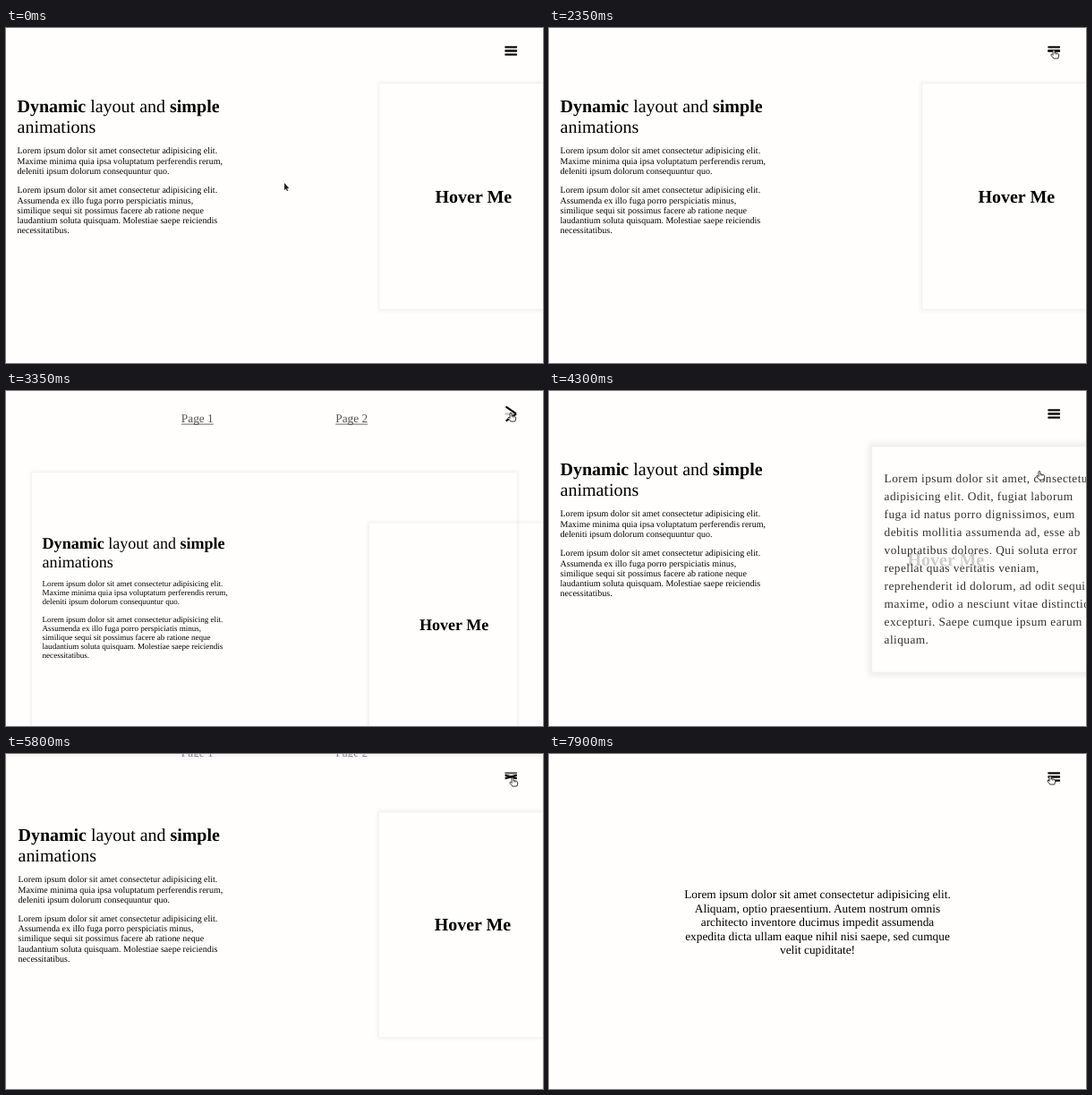
Recreate the animation shown at these times as an HTML page with a canvas. Size 600 px wide and 374 px high, loop 8 s.

```html
<!DOCTYPE html>
<html lang="en">
<head>
<meta charset="utf-8">
<title>Dynamic layout</title>
<style>
  html, body { margin: 0; width: 100%; height: 100%; overflow: hidden; background: #fffefc; }
  canvas { display: block; width: 600px; height: 374px; }
</style>
</head>
<body>
<canvas id="stage"></canvas>
<script>
const W = 600, H = 374, LOOP = 8000;
const BG = '#fffefc', INK = '#000';
const SERIF = '"Liberation Serif", "Times New Roman", serif';
const canvas = document.getElementById('stage');
const ctx = canvas.getContext('2d');
const dpr = window.devicePixelRatio || 1;
canvas.width = W * dpr;
canvas.height = H * dpr;
ctx.textRendering = 'geometricPrecision';

const intro = [
  'Lorem ipsum dolor sit amet consectetur adipisicing elit.',
  'Maxime minima quia ipsa voluptatum perferendis rerum,',
  'deleniti ipsum dolorum consequuntur quo.'
];
const body = [
  'Lorem ipsum dolor sit amet consectetur adipisicing elit.',
  'Assumenda ex illo fuga porro perspiciatis minus,',
  'similique sequi sit possimus facere ab ratione neque',
  'laudantium soluta quisquam. Molestiae saepe reiciendis',
  'necessitatibus.'
];
const cardText = [
  'Lorem ipsum dolor sit amet, consectetur',
  'adipisicing elit. Odit, fugiat laborum',
  'fuga id natus porro dignissimos, eum',
  'debitis mollitia assumenda ad, esse ab',
  'voluptatibus dolores. Qui soluta error',
  'repellat quas veritatis veniam,',
  'reprehenderit id dolorum, ad odit sequi',
  'maxime, odio a nesciunt vitae distinctio',
  'excepturi. Saepe cumque ipsum earum',
  'aliquam.'
];
const secondPage = [
  'Lorem ipsum dolor sit amet consectetur adipisicing elit.',
  'Aliquam, optio praesentium. Autem nostrum omnis',
  'architecto inventore ducimus impedit assumenda',
  'expedita dicta ullam eaque nihil nisi saepe, sed cumque',
  'velit cupiditate!'
];

// Switch times: [ms, new state]
const menuSwitches = [[2345, 1], [3308, 0], [5747, 1], [6958, 0]];
const hoverSwitches = [[4165, 1], [4780, 0]];
const LEAVE = 6958, ENTER = 7350;

// Pointer track: [ms, x, y]
const track = [
  [400, 311, 173], [850, 390, 70], [1300, 478, 31], [1500, 478, 31],
  [2000, 564, 24], [4000, 564, 24], [4300, 548, 89], [4550, 530, 135],
  [4680, 535, 110], [4780, 546, 62], [5000, 556, 46], [5450, 566, 26],
  [6220, 566, 26], [6350, 422, 36], [6500, 422, 36], [6600, 403, 37],
  [7300, 403, 37], [7600, 550, 26], [7750, 550, 26], [7900, 560, 24]
];

const clamp = v => Math.max(0, Math.min(1, v));

function bezier(x1, y1, x2, y2) {
  const at = (a, b, s) => 3 * a * s * (1 - s) ** 2 + 3 * b * s * s * (1 - s) + s ** 3;
  return x => {
    if (x <= 0) return 0;
    if (x >= 1) return 1;
    let lo = 0, hi = 1;
    for (let i = 0; i < 24; i++) {
      const mid = (lo + hi) / 2;
      if (at(x1, x2, mid) < x) lo = mid; else hi = mid;
    }
    return at(y1, y2, lo);
  };
}
const ease = bezier(0.25, 0.1, 0.25, 1);
const easeInOut = bezier(0.42, 0, 0.58, 1);

function lastSwitch(list, t) {
  return list.filter(s => s[0] <= t).pop() || [-LOOP, 0];
}

function progress(list, t, duration, curve) {
  const [start, state] = lastSwitch(list, t);
  const v = curve((t - start) / duration);
  return state ? v : 1 - v;
}

function pointerAt(t) {
  const next = track.findIndex(k => k[0] > t);
  if (next === 0) return track[0].slice(1);
  if (next < 0) return track[track.length - 1].slice(1);
  const [ta, xa, ya] = track[next - 1], [tb, xb, yb] = track[next];
  const k = (t - ta) / (tb - ta);
  return [xa + (xb - xa) * k, ya + (yb - ya) * k];
}

function setFont(size, weight = 'normal') {
  ctx.font = `${weight} ${size}px ${SERIF}`;
}

function lines(list, x, y, step) {
  list.forEach((line, i) => ctx.fillText(line, x, y + i * step));
}

// Shadow outside the box only, so the box itself stays see-through
function outerShadow(x, y, w, h, { blur, spread, alpha }) {
  ctx.save();
  ctx.beginPath();
  ctx.rect(-200, -200, W + 600, H + 600);
  ctx.rect(x, y, w, h);
  ctx.clip('evenodd');
  // The caster sits far off the stage; only its shadow is seen
  const away = 3000;
  ctx.shadowColor = `rgba(0,0,0,${alpha})`;
  ctx.shadowBlur = blur * dpr;
  ctx.shadowOffsetX = away * ctx.getTransform().a;
  ctx.fillStyle = INK;
  ctx.fillRect(x - spread - away, y - spread, w + 2 * spread, h + 2 * spread);
  ctx.restore();
}

function drawNav(t) {
  const slide = progress(menuSwitches, t, 350, ease);
  const alpha = progress(menuSwitches, t, 200, ease);
  if (!alpha) return;
  const y = 41.5 - 48 * (1 - slide);
  ctx.save();
  ctx.globalAlpha = alpha;
  ctx.textAlign = 'center';
  setFont(13.35);
  [['Page 1', 213.8], ['Page 2', 386.2]].forEach(([label, x]) => {
    const w = ctx.measureText(label).width;
    ctx.fillText(label, x, y);
    ctx.fillRect(x - w / 2, y + 1.5, w, 0.9);
  });
  ctx.restore();
}

function drawHeading() {
  let x = 12.5;
  [['Dynamic', 'bold'], [' layout and ', 'normal'], ['simple', 'bold']].forEach(([part, weight]) => {
    setFont(20, weight);
    ctx.fillText(part, x, 94);
    x += ctx.measureText(part).width;
  });
  setFont(20);
  ctx.fillText('animations', 12.5, 117);
}

function drawCard(t) {
  const p = progress(hoverSwitches, t, 300, ease);
  const fade = progress(hoverSwitches, t, 270, ease);
  const x = 417.5 - 75 * p;
  outerShadow(x, 62.3, 270, 251.5, { blur: 4 + 3 * p, spread: 2 + 2.5 * p, alpha: 0.06 + 0.015 * p });
  ctx.save();
  const base = ctx.globalAlpha;
  ctx.globalAlpha = base * (1 - fade);
  ctx.textAlign = 'center';
  setFont(20, 'bold');
  ctx.fillText('Hover Me', 522.3 - 105 * p, 194.5);
  ctx.globalAlpha = base * fade;
  ctx.textAlign = 'left';
  setFont(13.34);
  ctx.letterSpacing = '0.43px';
  lines(cardText, x + 13.5, 102.2, 20);
  ctx.restore();
}

function drawFirstPage(t) {
  const leaving = t >= LEAVE;
  const alpha = leaving ? 1 - ease((t - LEAVE) / 300) : 1;
  if (!alpha) return;
  const p = leaving ? 1 : progress(menuSwitches, t, 400, easeInOut);
  ctx.save();
  ctx.globalAlpha = alpha;
  ctx.translate(30 * p, 93.5 * p);
  ctx.scale(1 - 0.1 * p, 1 - 0.1 * p);
  if (p > 0) outerShadow(0, 0, W, H, { blur: 4, spread: 1, alpha: 0.07 });
  if (!leaving) {
    ctx.fillStyle = BG;
    ctx.fillRect(0, 0, W, H);
    ctx.fillStyle = INK;
  }
  drawHeading();
  setFont(10.03);
  lines(intro, 12.5, 140.4, 11.25);
  lines(body, 12.5, 184.3, 11.25);
  drawCard(t);
  ctx.restore();
}

function drawSecondPage(t) {
  const alpha = ease(clamp((t - ENTER) / 300));
  if (!alpha) return;
  ctx.save();
  ctx.globalAlpha = alpha;
  ctx.textAlign = 'center';
  setFont(13.34);
  lines(secondPage, 300, 161.4, 15.45);
  ctx.restore();
}

function bar(y, angle, alpha = 1) {
  ctx.save();
  ctx.globalAlpha = alpha;
  ctx.fillStyle = '#0c0c0c';
  ctx.translate(564.2, y);
  ctx.rotate(angle);
  ctx.beginPath();
  ctx.roundRect(-6.9, -1.15, 13.8, 2.3, 0.7);
  ctx.fill();
  ctx.restore();
}

// Outer bars jump to or from the middle at once; only turn and fade are eased
function drawBurger(t) {
  const open = lastSwitch(menuSwitches, t)[1];
  const p = progress(menuSwitches, t, 250, ease);
  const mid = 25.5, gap = 4.1, turn = p * Math.PI / 4;
  bar(open ? mid - gap : mid, 0, 1 - p);
  bar(open ? mid : mid - gap, turn);
  bar(open ? mid : mid + gap, -turn);
}

const arrow = new Path2D('M0 0V8L1.8 6.4 3 9 4.2 8.5 3.1 6 5.4 5.8Z');
const hand = new Path2D(
  'M-1 1Q0 -.6 1 1V3.6L4.6 4.3Q6 4.8 5.7 7L4.8 10H0L-3 6.6Q-3.2 5 -2 5.4L-1 6.4Z');
const fingers = new Path2D('M1 3.6V5.4M2.5 4.2V5.6M4 4.5V5.8');

function drawPointer(t) {
  const [x, y] = pointerAt(t);
  const onIcon = x >= 556 && y < 38;
  const onCard = t >= hoverSwitches[0][0] && t < hoverSwitches[1][0];
  const onLink = t > 6560 && t < LEAVE + 100;
  ctx.save();
  ctx.translate(x, y);
  ctx.lineJoin = 'round';
  if (onIcon || onCard || onLink) {
    ctx.fillStyle = '#fff';
    ctx.strokeStyle = '#222';
    ctx.lineWidth = 0.9;
    ctx.fill(hand);
    ctx.stroke(hand);
    ctx.lineWidth = 0.6;
    ctx.stroke(fingers);
  } else {
    ctx.strokeStyle = '#fff';
    ctx.lineWidth = 1;
    ctx.stroke(arrow);
    ctx.fillStyle = '#222';
    ctx.fill(arrow);
  }
  ctx.restore();
}

function draw(t) {
  ctx.setTransform(dpr, 0, 0, dpr, 0, 0);
  ctx.fillStyle = BG;
  ctx.fillRect(0, 0, W, H);
  ctx.fillStyle = INK;
  drawNav(t);
  drawFirstPage(t);
  drawSecondPage(t);
  drawBurger(t);
  drawPointer(t);
}

const start = performance.now();
function tick() {
  draw((performance.now() - start) % LOOP);
  requestAnimationFrame(tick);
}
tick();
</script>
</body>
</html>
```
